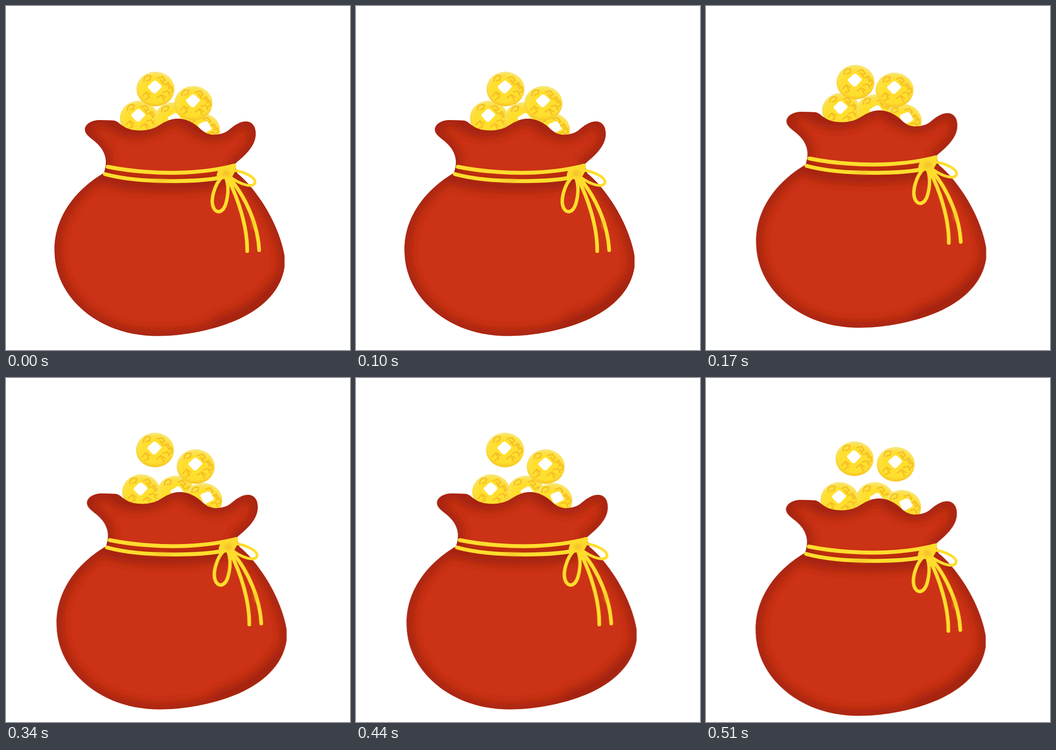
Write an HTML page that moves like this. It is 748 by 748 pixels and loops after 0.68 s.

```html
<!DOCTYPE html>
<html lang="en">
<head>
<meta charset="utf-8">
<title>Lucky bag</title>
<style>
  html, body { margin: 0; width: 100%; height: 100%; overflow: hidden; background: #fff; }
  svg { display: block; width: 100%; height: 100%; }
  .line { fill: none; stroke-linecap: round; stroke-linejoin: round; }
</style>
</head>
<body>
<svg viewBox="0 0 748 748">
  <defs>
    <radialGradient id="gold" cx=".5" cy=".58" r=".6">
      <stop offset=".62" stop-color="#ffdf2e"/>
      <stop offset=".82" stop-color="#fce14c"/>
      <stop offset="1" stop-color="#f5eb98"/>
    </radialGradient>
    <radialGradient id="rim" cx=".5" cy=".42" r=".6">
      <stop offset=".76" stop-color="#f6bd1e" stop-opacity="0"/>
      <stop offset="1" stop-color="#f2b51e" stop-opacity=".85"/>
    </radialGradient>
    <filter id="soft" filterUnits="userSpaceOnUse" x="40" y="180" width="640" height="600">
      <feGaussianBlur stdDeviation="11"/>
    </filter>
    <filter id="spot" x="-60%" y="-60%" width="220%" height="220%">
      <feGaussianBlur stdDeviation="3"/>
    </filter>
    <path id="shape" d="M171.500 268C173 255 188 248 205 248L235 249C246 252 250 261 266 267
      C284 273 310 272 327 263C342 254 356 245 373 245C391 245 407 253 419 264
      C432 277 442 280 451 280C463 280 475 277 483 271C496 260 508 251 522 251
      C537 252 543 263 543 279C542 308 515 328 497 344L503 364
      C522 379 541 402 558 428C584 468 600 510 605.500 543L605.500 568
      C598 615 565 652 510 679C455 705 385 717.500 330 717.500C253 717.500 193 689 153.500 648
      C123 615 105.500 577 105.500 530C105.500 455 155 397 213 363C219 345 220 328 207 309
      C193 289 171.500 284 171.500 268Z"/>
    <clipPath id="inside"><use href="#shape"/></clipPath>
    <g id="face">
      <ellipse rx="41.3" ry="37.7" fill="url(#gold)"/>
      <ellipse rx="41.3" ry="37.7" fill="url(#rim)"/>
      <path class="line" stroke="#f6c024" stroke-width="3.2" d="M-25-17L-24-24Q-20-31-10-28L-12-20L-19-18
        M5-24L15-27L21-19L14-15M11-20L17-11
        M20-9L28-14L33-6M25-11L30-3M29-1L36-4L37 4L30 9
        M-28 15L-20 6L-11 12M-20 7L-14 18M-22 23L-13 18
        M4 19L13 12L22 18M13 13L19 25M17 7L27 4L31 13"/>
    </g>
    <path id="hole" d="M-3-13Q0-15.500 4-13L14-4Q16.500-1 13 2L3 12.500Q0 15-4 12.500L-14 2Q-16.500-1-13-4Z" fill="#fff"/>
  </defs>

  <g id="coins"></g>

  <g id="bag">
    <use href="#shape" fill="#cc3316"/>
    <g clip-path="url(#inside)">
      <g class="line" filter="url(#soft)" stroke="#a0200e">
        <use href="#shape" stroke-width="24"/>
        <path d="M212 372C265 393 390 395 470 378" stroke-width="28"/>
        <path d="M228 262Q262 282 300 276M385 254Q415 281 455 286" stroke-width="16"/>
        <path d="M460 693Q550 665 590 606" stroke-width="34"/>
      </g>
    </g>
    <g class="line" stroke="#ffdd2d" stroke-width="8.5">
      <path d="M221 349.500C275 360.500 340 364.500 390 362C430 360 465 355 496 347"/>
      <path d="M215 365.500C260 378 320 381.500 380 380.500C420 380 450 377 478 371"/>
      <path d="M471 371C453 387 443 424 452 440C459 452 472 449 478 430C484 409 484 388 478 373" stroke-width="7.5"/>
      <path d="M492 357C517 359 547 374 540.500 386C534 396 508 387 488 372" stroke-width="6"/>
      <path d="M482 374C505 419 525 480 524.500 533M486 374C525 420 548 480 550.500 531" stroke-width="8"/>
    </g>
    <path d="M463 355L494 343Q501 343 500 351L497 362L488 378L476 375L459 376Q456 366 463 355Z" fill="#ffdb2d"/>
    <g fill="#f1b82b" filter="url(#spot)" opacity=".7">
      <ellipse cx="479" cy="364" rx="9" ry="7"/>
      <ellipse cx="335" cy="380" rx="18" ry="2.500"/>
      <ellipse cx="538" cy="473" rx="2.500" ry="12"/>
    </g>
  </g>
</svg>
<script>
  const LOOP = 680;

  // Each pose holds for a quarter of the loop.
  function hop(el, moves) {
    const poses = [[0, 0], ...moves, [0, 0]];
    el.animate(poses.map(([x, y], i) => ({
      transform: `translate(${x}px, ${y}px)`,
      offset: i / 4,
      easing: 'step-end'
    })), { duration: LOOP, iterations: Infinity });
  }

  // Listed from back to front.
  const coins = [
    { at: [289, 243.5], hole: [-1.5, -5.5], moves: [[5, -17], [5, 3.5], [1.5, 20.5]] },
    { at: [363.5, 247], hole: [3, -0.5], turn: 10, moves: [[4, -17], [6, 3], [4, 17]] },
    { at: [424, 270], hole: [8, -6], turn: 20, moves: [[3.5, -20], [5, -4], [2.5, 11]] },
    { at: [325, 180.5], hole: [-1.5, -4], moves: [[0, -15], [-1, -24], [-2, -5]] },
    { at: [407.5, 211.5], hole: [-1, -5], moves: [[2.5, -29], [5, -19], [5, -24]] }
  ];

  const layer = document.getElementById('coins');
  for (const { at, hole, turn = 0, moves } of coins) {
    const coin = document.createElementNS('http://www.w3.org/2000/svg', 'g');
    coin.innerHTML = `<g transform="translate(${at})"><use href="#face"/>
      <use href="#hole" transform="translate(${hole}) rotate(${turn})"/></g>`;
    layer.append(coin);
    hop(coin, moves);
  }
  hop(document.getElementById('bag'), [[3.5, -18], [4.5, 3], [2.5, 17]]);
</script>
</body>
</html>
```
